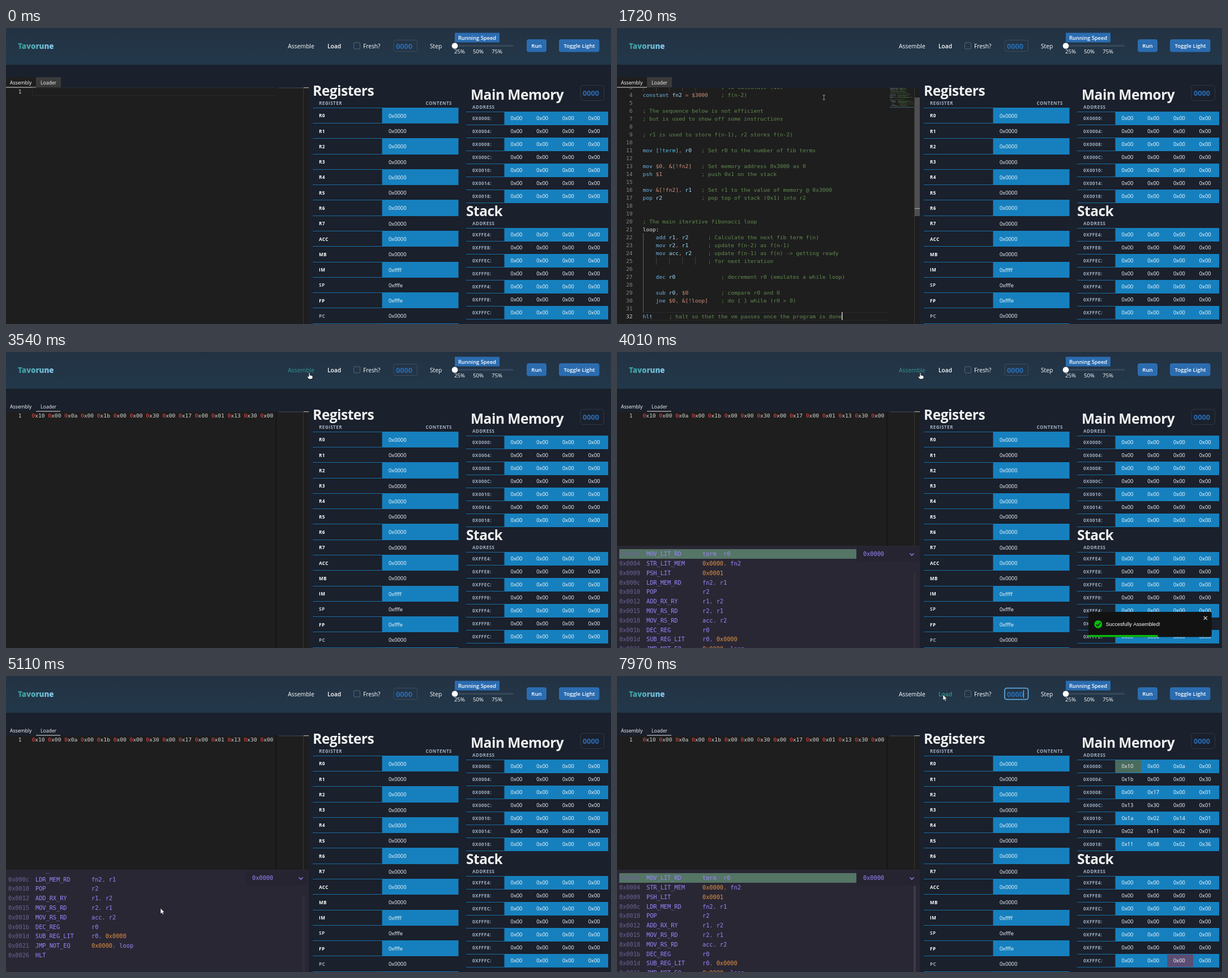
Animation of 1069x524 px, one loop 8000 ms. Source, as an HTML page with a canvas:

```html
<!DOCTYPE html>
<html lang="en">
<head>
<meta charset="utf-8">
<title>Assembler playground</title>
<style>
html, body { margin: 0; width: 100%; height: 100%; overflow: hidden; background: #1a202c; }
canvas { display: block; width: 1069px; height: 524px; }
</style>
</head>
<body>
<canvas id="stage" width="1069" height="524"></canvas>
<script>
const c = document.getElementById('stage').getContext('2d');
const UI = '"Open Sans", "Noto Sans", sans-serif';
const MONO = '"DejaVu Sans Mono", "Noto Sans Mono", monospace';
const LOOP = 8000, CH = 5.767, LINE = 13.985;
const BLUE = '#1680be', RULE = '#1a6c9f', BUTTON = '#2b6cb0', TEAL = '#319795';

const PROGRAM = `; Fibonacci sequence in assembly
constant term = $000a   ; number of terms
                        ; to calculate (10)
constant fn2 = $3000    ; f(n-2)

; The sequence below is not efficient
; but is used to show off some instructions

; r1 is used to store f(n-1), r2 stores f(n-2)

mov [!term], r0   ; Set r0 to the number of fib terms

mov $0, &[!fn2]   ; Set memory address 0x3000 as 0
psh $1            ; push 0x1 on the stack

mov &[!fn2], r1   ; Set r1 to the value of memory @ 0x3000
pop r2            ; pop top of stack (0x1) into r2


; The main iterative fibonacci loop
loop:
    add r1, r2      ; Calculate the next fib term f(n)
    mov r2, r1      ; update f(n-2) as f(n-1)
    mov acc, r2     ; update f(n-1) as f(n) -> getting ready
                    ; for next iteration

    dec r0              ; decrement r0 (emulates a while loop)

    sub r0, $0          ; compare r0 and 0
    jne $0, &[!loop]    ; do { } while (r0 > 0)

hlt     ; halt so that the vm pauses once the program is done`.split('\n');

const LISTING = `0x0000 MOV_LIT_RD term, r0
0x0004 STR_LIT_MEM 0x0000, fn2
0x0009 PSH_LIT 0x0001
0x000c LDR_MEM_RD fn2, r1
0x0010 POP r2
0x0012 ADD_RX_RY r1, r2
0x0015 MOV_RS_RD r2, r1
0x0018 MOV_RS_RD acc, r2
0x001b DEC_REG r0
0x001d SUB_REG_LIT r0, 0x0000
0x0021 JMP_NOT_EQ 0x0000, loop
0x0026 HLT`.split('\n');

const BYTES = ('10 00 0a 00 1b 00 00 30 00 17 00 01 13 30 00 01 ' +
  '1a 02 14 01 02 11 02 01 11 08 02 36').split(' ');

// Times of the hard changes
const CLICK = 690, PASTE = 1170, TAB = 3540, PANE = 3630, TOAST = 3575, LOADED = 7810;

// [time, x, y]
const MOUSE = [[150, 616, 2], [460, 458, 132], [859, 458, 132], [860, 453, 132],
  [1170, 453, 132], [1400, 366.5, 123], [1720, 366.5, 123], [2130, 27, 88], [2510, 462, 86],
  [2579, 462, 86], [2580, 517, 87], [2700, 517, 87], [3300, 536, 36], [4080, 536, 36],
  [4630, 304, 378], [4870, 273, 411], [6029, 273, 411], [6030, 366, 281.5], [6400, 596, 90],
  [6580, 585, 66], [6750, 585, 66], [6960, 578, 30], [7589, 578, 30], [7590, 571, 25],
  [7810, 571, 25], [7890, 576, 33]];
// [time, offset]
const SCROLL = [[5039, 0], [5040, 24], [5110, 48], [5419, 48], [5420, 32], [5580, 0]];

function at(keys, t) {
  if (t <= keys[0][0]) return keys[0].slice(1);
  const i = keys.findIndex(k => k[0] > t);
  if (i < 0) return keys[keys.length - 1].slice(1);
  const a = keys[i - 1], b = keys[i], p = (t - a[0]) / (b[0] - a[0]);
  return a.slice(1).map((v, j) => v + (b[j + 1] - v) * p);
}

function bezier(x1, y1, x2, y2) {
  const f = (a, b, u) => 3 * a * u * (1 - u) ** 2 + 3 * b * u * u * (1 - u) + u ** 3;
  return x => {
    let lo = 0, hi = 1;
    for (let i = 0; i < 20; i++) {
      const m = (lo + hi) / 2;
      if (f(x1, x2, m) < x) lo = m; else hi = m;
    }
    return f(y1, y2, lo);
  };
}
const bounce = bezier(.215, .61, .355, 1), ease = bezier(.25, .1, .25, 1);

function rect(x, y, w, h, color) { c.fillStyle = color; c.fillRect(x, y, w, h); }

function round(x, y, w, h, r, fill, stroke, width = 1) {
  c.beginPath();
  c.roundRect(x, y, w, h, r);
  if (fill) { c.fillStyle = fill; c.fill(); }
  if (stroke) { c.strokeStyle = stroke; c.lineWidth = width; c.stroke(); }
}

function disc(x, y, r, color) {
  c.beginPath();
  c.arc(x, y, r, 0, 7);
  c.fillStyle = color;
  c.fill();
}

function line(points, color, width = 1) {
  c.beginPath();
  points.forEach(p => c.lineTo(...p));
  c.strokeStyle = color;
  c.lineWidth = width;
  c.stroke();
}

// y is the middle of the capitals
function text(s, x, y, size, color, { weight = 400, family = UI, align = 'left', gap = 0 } = {}) {
  c.font = `${weight} ${size}px ${family}`;
  c.letterSpacing = gap + 'px';
  c.textAlign = align;
  c.fillStyle = color;
  c.fillText(s, x, y + size * .36);
}
const mono = (s, x, y, color, size = 9.58) => text(s, x, y, size, color, { family: MONO });
const label = (s, x, y, color = '#a0aec0', align) =>
  text(s, x, y, 8, color, { weight: 700, gap: .5, align });
const heading = (s, x, y) => text(s, x, y, 24.5, '#f0f0f0', { weight: 700, gap: -.5 });

function clipped(x, y, w, h, draw) {
  c.save();
  c.beginPath();
  c.rect(x, y, w, h);
  c.clip();
  draw();
  c.restore();
}

function header(t, over) {
  const g = c.createLinearGradient(0, 0, 0, 65);
  g.addColorStop(0, '#233243');
  g.addColorStop(1, '#22384a');
  rect(0, 0, 1069, 65, g);
  const brand = c.createLinearGradient(21, 0, 89, 0);
  brand.addColorStop(0, '#319795');
  brand.addColorStop(1, '#90cdf4');
  text('Tavorune', 21, 32, 13.2, brand, { weight: 800 });

  text('Assemble', 498, 32, 10.4, over === 'Assemble' ? TEAL : '#fff');
  text('Load', 568, 32, 10.2, over === 'Load' ? TEAL : '#fff', { weight: 600 });
  round(614.5, 26, 11, 11, 1.5, null, '#566474');
  text('Fresh?', 631, 32, 10.2, '#fff');
  const focus = t >= LOADED;
  round(685, 21.5, 41.5, 20, 3.5, null, focus ? '#63b3ed' : '#3d4d5f', focus ? 1.6 : 1);
  text('0000', 689, 32, 12.7, BUTTON, { weight: 700 });
  if (focus) rect(718, 25, 1, 14, '#a9c6e0');
  text('Step', 749, 32, 10.2, '#fff');

  round(793, 30, 104, 3, 1.5, '#36475a');
  disc(793, 31.5, 5.3, '#fff');
  rect(793, 8.5, 79, 17, BUTTON);
  text('Running Speed', 832.5, 17.5, 9.3, '#fff', { weight: 600, align: 'center' });
  ['25%', '50%', '75%'].forEach((s, i) => text(s, 792 + 33 * i, 42, 9.7, '#fff'));
  round(920, 20, 35, 22.4, 4, BUTTON);
  text('Run', 937.5, 32, 9.6, '#fff', { weight: 600, align: 'center' });
  round(977, 20, 71.5, 22.4, 4, BUTTON);
  text('Toggle Light', 1013, 32, 9.6, '#fff', { weight: 600, align: 'center' });
}

// Rules over the label column and filled value cells in every other row
function stripes(x, split, right, top, pitch, rows) {
  for (let r = 0; r <= rows; r++) {
    const y = Math.floor(top + pitch * r), next = Math.floor(top + pitch * (r + 1));
    rect(x, y, split - x, 1, RULE);
    if (r % 2 === 0 && r < rows) rect(split, y, right - split, next - y + 1, BLUE);
  }
}

function registers() {
  heading('Registers', 542, 111);
  label('REGISTER', 553, 133);
  label('CONTENTS', 788, 133, undefined, 'right');
  const names = ['R0', 'R1', 'R2', 'R3', 'R4', 'R5', 'R6', 'R7', 'ACC', 'MB', 'IM', 'SP', 'FP', 'PC'];
  const values = { IM: '0xffff', SP: '0xfffe', FP: '0xfffe' };
  stripes(542, 664.5, 799.5, 141.3, 27.27, 15);
  names.forEach((name, i) => {
    const y = 155.5 + 27.27 * i;
    label(name, 553, y, { PC: '#a0aec0', SP: '#cbd5e0' }[name] || '#fff');
    text(values[name] || '0x0000', 676, y, 9.3, '#fff');
  });
}

function memoryTable(top, base, bytes, mark, markColor) {
  label('ADDRESS', 824, top - 8.5);
  stripes(813, 880.5, 1064, top, 23, 7);
  for (let r = 0; r < 7; r++) {
    const y = top + 23 * r;
    const address = (base + 4 * r).toString(16).toUpperCase().padStart(4, '0');
    label('0X' + address + ':', 824, y + 11.5);
    for (let k = 0; k < 4; k++) {
      const n = 4 * r + k;
      if (n === mark) rect(880.5 + 45.85 * k, y + .5, 45.85, 22, markColor);
      text('0x' + (bytes[n] || '00'), 902 + 45.7 * k, y + 11.5, 9.3, '#fff', { align: 'center' });
    }
  }
}

function memory(t) {
  const loaded = t >= LOADED;
  heading('Main Memory', 821, 118);
  round(1015, 101.5, 41.5, 27, 4, null, '#303846');
  text('0000', 1019, 115.5, 12.7, BUTTON, { weight: 700 });
  memoryTable(148.5, 0, loaded ? BYTES : [], loaded ? 0 : -1, '#4a6b5e');
  heading('Stack', 813, 324);
  memoryTable(354.5, 0xffe4, [], loaded ? 26 : -1, '#5b4d73');
}

function tabs(loader) {
  if (!loader) {
    rect(0, 87, 53, 18, '#1e1e1e');
    round(53, 87, 44, 18, 1, '#3a3a3a');
  }
  text('Assembly', 7, 97, 8.6, '#fff');
  text('Loader', 61, 97, 8.6, '#f0f0f0');
  if (loader) rect(53, 104.5, 43, 1, '#e0e0e0');
  else rect(0, 104.5, 53, 1, '#e0e0e0');
}

function codeColor(token, first) {
  if (token[0] === ';') return '#608b4e';
  if (token[0] === '[') return '#4fc1e9';
  if (/[$&]/.test(token[0])) return '#ce9178';
  if (/[=,]/.test(token)) return '#c8705f';
  if (/loop|:/.test(token)) return '#dcdcdc';
  return first ? '#6cb2e2' : '#9cdcfe';
}

function codeLine(s, y) {
  const start = s.search(/\S/);
  for (const m of s.matchAll(/;.*|&?\[!\w+\]|[,=:]|[$\w]+/g))
    mono(m[0], 45.5 + m.index * CH, y, codeColor(m[0], m.index === start));
}

function currentLine(y) {
  rect(47, y - 7, 430, 1, '#2a2a2a');
  rect(47, y + 6.5, 430, 1, '#2a2a2a');
  rect(46, y - 7, 1, 14, '#2a2a2a');
}

function lineNumber(n, y, active) {
  text(n, 27.5, y, 9.58, active ? '#d0d0d0' : '#858585', { family: MONO, align: 'right' });
}

function program(t) {
  const rowY = n => 118.5 + (n - 4) * LINE;
  clipped(0, 106, 535, 418, () => {
    currentLine(rowY(32));
    [3, 25].forEach(n => {
      for (let k = n === 3 ? 0 : 4; k < 20; k += 4) rect(46 + k * CH, rowY(n) - 7, 1, 14, '#404040');
    });
    rect(46, rowY(22) - 7, 1, LINE * 10, '#606060');
    PROGRAM.forEach((s, i) => {
      const y = rowY(i + 1);
      if (y < 98) return;
      lineNumber(i + 1, y, i === 31);
      codeLine(s, y);
    });
  });
  if (Math.floor((t - 1400) / 500) % 2 === 0) rect(397, 503, 1.4, 14, '#d8d8d8');

  PROGRAM.forEach((s, i) => {
    const y = 106 + i * 1.08;
    for (const m of s.matchAll(/;.*|[^\s;]+/g)) {
      const comment = m[0][0] === ';';
      for (const w of m[0].matchAll(/\S+/g))
        rect(482.5 + (m.index + w.index) * .68, y, w[0].length * .68, .75,
          comment ? 'rgba(96,139,78,.6)' : 'rgba(156,190,210,.5)');
    }
  });
  rect(482, 140, 43, 1, '#2f5573');
  const fade = 1 - Math.min(1, Math.max(0, (t - 2750) / 550));
  rect(526, 123, 9, 210, `rgba(121,121,121,${.55 * fade})`);
  rect(526, 319, 9, 1.2, '#a0a0a0');
}

function editor(t) {
  const loader = t >= TAB;
  tabs(loader);
  rect(0, 106, 535, 418, '#1e1e1e');
  rect(525, 106, 1, 418, '#363636');
  if (t >= PASTE && !loader) return program(t);

  lineNumber(1, 112.5, true);
  if (loader) {
    BYTES.slice(0, 15).forEach((b, i) => {
      const x = 45.5 + i * 5 * CH;
      mono('0', x, 112.5, '#f44747');
      mono('x' + b, x + CH, 112.5, '#d4d4d4');
    });
    rect(476, 106, 2, 418, '#151515');
  } else {
    currentLine(112.5);
    if (t >= CLICK) rect(46, 106, 1.4, 13, '#d8d8d8');
  }
  for (let x = 482; x < 525; x += 2) rect(x, 105.5, 1.4, 1, '#4a6076');
  rect(526, 105, 9, 1.3, '#a8a294');
}

function listing(t) {
  if (t < PANE) return;
  const size = 10.25, w = size * .602, offset = at(SCROLL, t)[0];
  rect(0, 343, 535, 181, '#2a2734');
  clipped(0, 349, 535, 175, () => LISTING.forEach((s, i) => {
    const y = 357.5 + 16.8 * i - offset;
    if (i === 0) rect(4, y - 8.5, 419, 17, '#557565');
    const [address, op, ...args] = s.split(' ');
    mono(address, 4, y, '#6b6494', size);
    mono(op, 52, y, '#9a86fd', size);
    for (const m of args.join(' ').matchAll(/,|[^\s,]+/g))
      mono(m[0], 151 + m.index * w, y, m[0] === ',' ? '#6c6783' : /^0x/.test(m[0]) ? '#e09142' : '#9a86fd', size);
  }));
  if (t < 5420) rect(524, 390, 4, 134, '#302d3b');
  else rect(524, 372, 4, 152, '#3e3b49');
  rect(423, 344, 112, 27, '#272431');
  mono('0x0000', 435, 357.5, '#9a86fd', size);
  line([[517.5, 356.5], [521, 360], [524.5, 356.5]], '#9a86fd', 1.3);
}

function toastShift(t) {
  const age = t - TOAST;
  if (age < 1000) {
    const stops = [[0, 2050], [.6, -17], [.75, 7], [.9, -3.4], [1, 0]];
    const p = Math.min(age / 700, 1);
    const i = Math.max(1, stops.findIndex(s => s[0] >= p));
    const [a, from] = stops[i - 1], [b, to] = stops[i];
    return from + (to - from) * bounce((p - a) / (b - a));
  }
  const p = (age - 1000) / 700;
  return p < .2 ? -14 * ease(p / .2) : -14 + 1380 * ease(Math.min(1, (p - .2) / .8));
}

function toast(t) {
  if (t < TOAST || t > TOAST + 1700) return;
  c.save();
  c.translate(840 + toastShift(t), 460);
  round(0, 0, 218, 44.5, 3, '#121212');
  rect(0, 41, 218 * Math.max(0, 1 - (t - TOAST) / 1000), 3.5, '#07bc0c');
  disc(17.5, 22, 7, '#07bc0c');
  line([[14, 22.5], [16.5, 25], [21, 19.5]], '#121212', 1.6);
  text('Succesfully Assembled!', 31, 22, 9.1, '#fff', { family: '"Liberation Sans", Arial, sans-serif' });
  line([[204, 8], [210, 14]], '#c8c8c8', 1.3);
  line([[210, 8], [204, 14]], '#c8c8c8', 1.3);
  c.restore();
}

function hovered(x, y) {
  if (y < 20 || y > 45) return '';
  return x >= 498 && x <= 546 ? 'Assemble' : x >= 567 && x <= 592 ? 'Load' : '';
}

function pointer(t, x, y, over) {
  if (t < 150) return;
  c.save();
  c.translate(x, y);
  const bottom = t >= PANE ? 343 : 524;
  if (over && t < LOADED) {
    const hand = new Path2D('M-1 1Q0-1 1 1V5L4 5.5L6 7V10L4 12H-1L-4 8Q-4 6-1 7.5Z');
    c.fillStyle = '#fff';
    c.fill(hand);
    c.strokeStyle = '#111';
    c.lineWidth = .8;
    c.stroke(hand);
  } else if (x < 525 && y > 106 && y < bottom) {
    line([[0, -4], [0, 4]], '#bbb', .8);
    line([[-2, -4], [2, -4]], '#bbb', .8);
    line([[-2, 4], [2, 4]], '#bbb', .8);
  } else {
    const arrow = new Path2D('M0 0V10L2.4 8L4 11.5L5.6 10.8L4.1 7.4H7Z');
    c.fillStyle = '#fff';
    c.fill(arrow);
    c.strokeStyle = '#111';
    c.lineWidth = .6;
    c.stroke(arrow);
  }
  c.restore();
}

function frame(now) {
  const t = now % LOOP;
  const [x, y] = at(MOUSE, t);
  const over = t < 150 ? '' : hovered(x, y);
  rect(0, 0, 1069, 524, '#1a202c');
  header(t, over);
  editor(t);
  listing(t);
  registers();
  memory(t);
  toast(t);
  pointer(t, x, y, over);
  requestAnimationFrame(frame);
}
requestAnimationFrame(frame);
</script>
</body>
</html>
```
